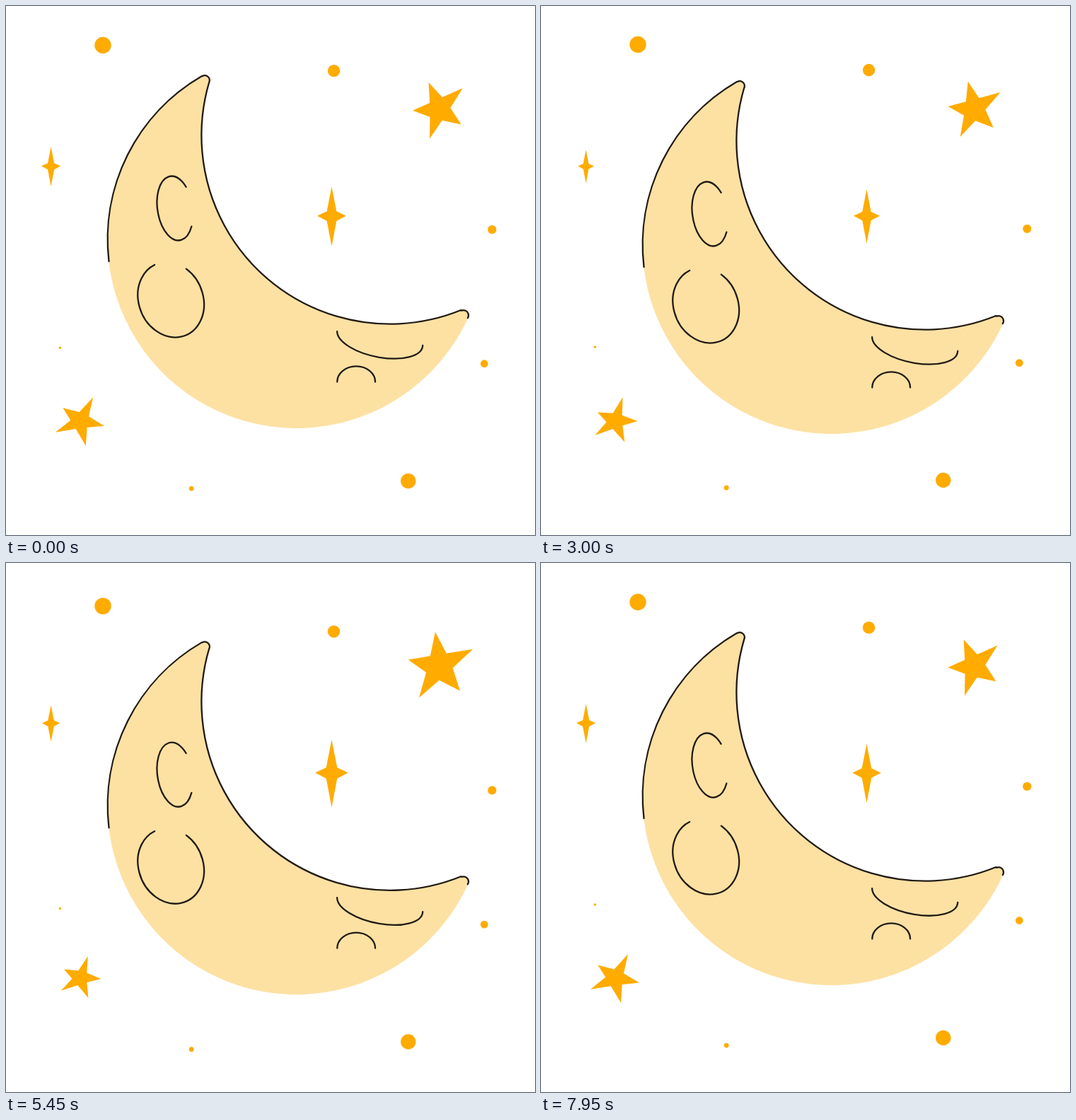
Recreate the animation shown at these times as an HTML page with a canvas. Size 748 px wide and 748 px high, loop 8 s.

```html
<!DOCTYPE html>
<html lang="en">
<head>
<meta charset="utf-8">
<title>Sleeping moon</title>
<style>
  html, body { margin: 0; width: 100%; height: 100%; overflow: hidden; background: #fff; }
  canvas { display: block; width: 748px; height: 748px; }
</style>
</head>
<body>
<canvas id="sky" width="748" height="748"></canvas>
<script>
const ctx = document.getElementById('sky').getContext('2d');
const PERIOD = 4000, STEP = 50, SIZE = 748;
const GOLD = '#ffab00', CREAM = '#fde1a3', INK = '#211b14';
const rad = deg => deg * Math.PI / 180;

const dots = [ // x, y, radius
  [137, 57.4, 11.7], [463.6, 93.5, 8.7], [687.3, 318, 6.1], [676.3, 507.6, 5.4],
  [568.8, 673.5, 10.7], [262.2, 684.2, 3.4], [76.4, 485.1, 1.7]
];

// Five tips; each notch is the middle of two tips pulled to the centre
function starShape(tips, pinch) {
  return tips.flatMap(([x, y], i) => {
    const [nx, ny] = tips[(i + 1) % tips.length];
    return [[x, y], [(x + nx) / 2 * pinch, (y + ny) / 2 * pinch]];
  });
}

// Four arms, the notches lie on the diagonals
function sparkleShape(width, height, notch) {
  return Array.from({ length: 8 }, (_, i) => {
    const a = i * Math.PI / 4;
    const [rx, ry] = i % 2 ? [notch, notch] : [width, height];
    return [rx * Math.cos(a), ry * Math.sin(a) - 1 + Math.sin(a) ** 2];
  });
}

const sparkle = sparkleShape(21, 43.3, 9.9);
const bigStar = starShape([[-8.3, -39.5], [37.7, -24], [27.7, 26], [-19.3, 39], [-36.5, -4]], 0.5);
const smallStar = starShape([[10.5, -32.5], [31.5, 1], [13.3, 30.7], [-28.5, 21], [-25, -11.5]], 0.46);

const twinklers = [
  { shape: sparkle, x: 460.5, y: 297.6, size: 1, pulse: 0.12, lag: 1.8, turn: 0, tilt: 0, turnLag: 0 },
  { shape: sparkle, x: 63.6, y: 227, size: 0.597, pulse: 0.12, lag: 0.785, turn: 0, tilt: 0, turnLag: 0 },
  { shape: bigStar, x: 612, y: 146, size: 1.088, pulse: 0.11, lag: 2.31, turn: -9, tilt: 0, turnLag: 0 },
  { shape: smallStar, x: 105, y: 586, size: 1, pulse: 0.1, lag: -0.05, turn: 8.2, tilt: 3.8, turnLag: 0.48 }
];

// Part of an ellipse, angles in degrees
function addArc(path, x, y, rx, ry, tilt, from, to) {
  const piece = new Path2D();
  piece.ellipse(x, y, rx, ry, rad(tilt), rad(from), rad(to));
  path.addPath(piece);
}
const face = new Path2D();
addArc(face, 239, 286, 24.9, 45.8, -8.4, 39, 323);
addArc(face, 233.2, 415.3, 45.4, 54.4, -22.6, -36, 267);
addArc(face, 528.7, 469.8, 61.5, 26.7, 11.3, -4, 175);
addArc(face, 495.2, 531.5, 26.9, 22.1, 0, 180, 360);

// Upper edge of the crescent: outer arc, round tip, inner arc, round tip
function traceEdge(path) {
  path.arc(410.5, 330, 266.8, rad(173.3), rad(239.9));
  path.arc(281, 105.2, 7, rad(-120), rad(15));
  path.arc(543, 183, 266.6, rad(196.5), rad(67.9), true);
  path.arc(647, 437.2, 7, rad(-112), rad(33));
}
const edge = new Path2D();
traceEdge(edge);
const body = new Path2D();
body.arc(410.5, 330, 267, rad(24.6), rad(173.3));
traceEdge(body);
body.closePath();

function drawMoon(phase) {
  ctx.save();
  ctx.translate(0, 8 * (1 - Math.cos(phase)));
  ctx.fillStyle = CREAM;
  ctx.fill(body);
  ctx.strokeStyle = INK;
  ctx.lineWidth = 2.3;
  ctx.lineCap = ctx.lineJoin = 'round';
  ctx.stroke(edge);
  ctx.stroke(face);
  ctx.restore();
}

function drawDots(phase) {
  const drift = 3.5 * Math.cos(phase - 2.13);
  for (const [x, y, r] of dots) {
    ctx.beginPath();
    ctx.arc(x, y + drift, r, 0, 2 * Math.PI);
    ctx.fill();
  }
}

function drawTwinkler(t, phase) {
  const scale = t.size * (1 + t.pulse * Math.cos(phase - t.lag));
  ctx.save();
  ctx.translate(t.x, t.y);
  ctx.rotate(rad(t.turn * Math.cos(phase - t.turnLag) + t.tilt));
  ctx.scale(scale, scale);
  ctx.beginPath();
  for (const [x, y] of t.shape) ctx.lineTo(x, y);
  ctx.fill();
  ctx.restore();
}

function draw(time) {
  const phase = Math.floor(time / STEP) * STEP % PERIOD / PERIOD * 2 * Math.PI;
  ctx.fillStyle = '#fff';
  ctx.fillRect(0, 0, SIZE, SIZE);
  drawMoon(phase);
  ctx.fillStyle = GOLD;
  drawDots(phase);
  for (const t of twinklers) drawTwinkler(t, phase);
}

const start = performance.now();
function tick() {
  draw(performance.now() - start);
  requestAnimationFrame(tick);
}
tick();
</script>
</body>
</html>
```
